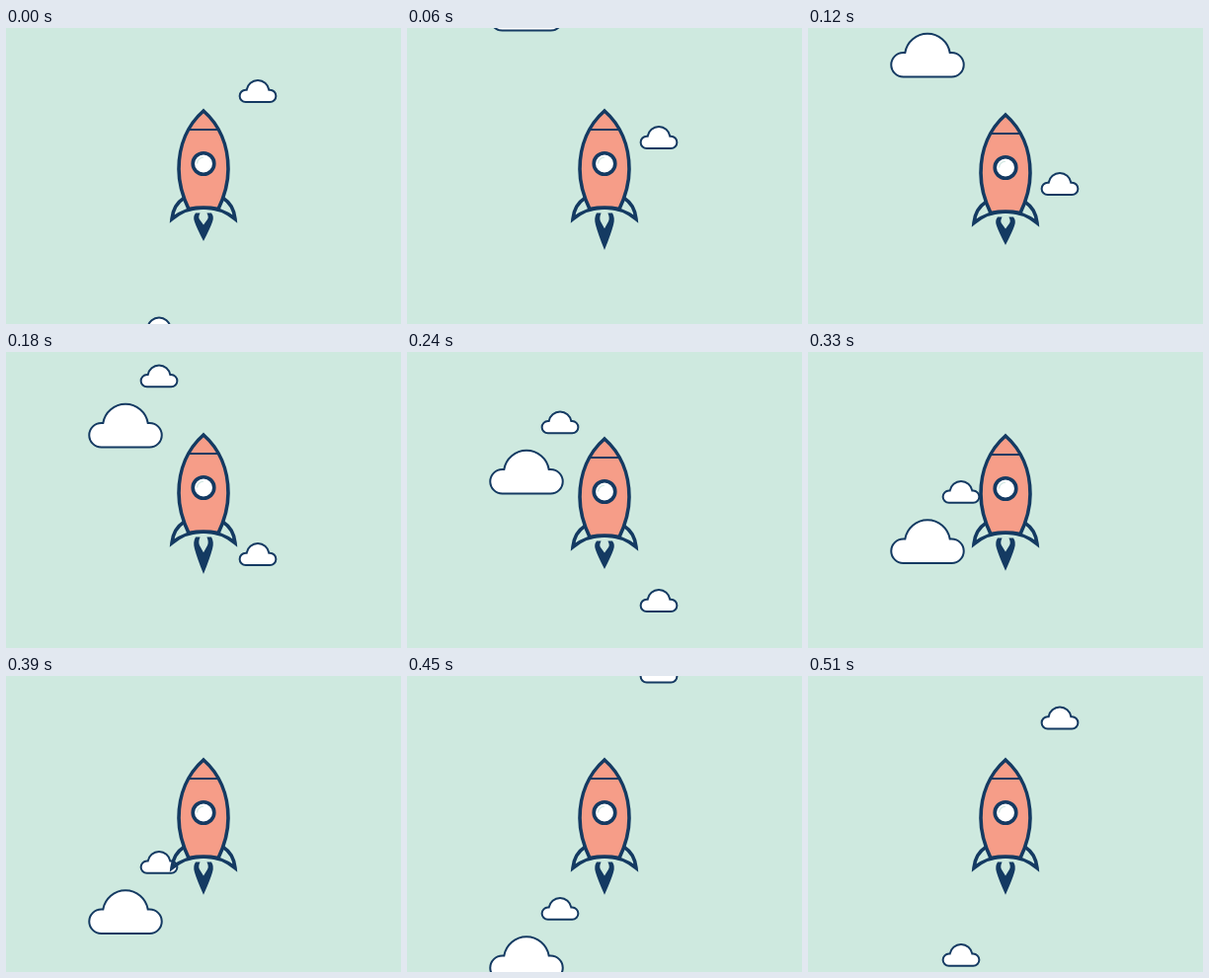
Recreate the animation shown at these times as an HTML page. Size 400x300 px, loop 540 ms.

```html
<!DOCTYPE html>
<html lang="en">
<head>
<meta charset="utf-8">
<title>Rocket</title>
<style>
  html, body { margin: 0; width: 100%; height: 100%; overflow: hidden; background: #cee9df; }
  svg { display: block; width: 100vw; height: 100vh; }
  .line { stroke: #143a62; stroke-width: 3.6; fill: none; }
  .cloud { stroke: #143a62; stroke-width: 2; fill: #fff; }
  .cloud path, path.cloud { vector-effect: non-scaling-stroke; }
</style>
</head>
<body>
<svg viewBox="0 0 400 300">
  <defs>
    <path id="puff" vector-effect="non-scaling-stroke"
      d="M-24.5 44A12.25 12.25 0 0 1 -24.5 19.5H-22.7A23 23 0 0 1 22.7 19.5H24.5A12.25 12.25 0 0 1 24.5 44Z"/>
  </defs>
  <g id="sky"></g>
  <g id="rocket">
    <path id="flame" fill="#143a62"
      d="M192 0H196.6Q194.3 4 196 6.5L200 12L204 6.5Q205.7 4 203.4 0H208Q211 4 209 9Q207 15 200 28.5Q193 15 191 9Q189 4 192 0Z"/>
    <path class="line" fill="none" d="M180 172.5Q169.5 179 168 193.5Q182 182 200 182Q218 182 232 193.5Q230.5 179 220 172.5"/>
    <path class="line" style="fill:#f69d88"
      d="M185 183.5C179 171 175 158 175 143C175 119 184 98 200 84C216 98 225 119 225 143C225 158 221 171 215 183.5Q200 180.8 185 183.5Z"/>
    <path class="line" style="stroke-width:2" d="M186 103H214"/>
    <circle class="line" style="fill:#fff" cx="200" cy="137.5" r="10.8"/>
    <path d="M193.6 137.5A6.4 6.4 0 0 1 200 131.1" fill="none" stroke="#d5e9e4" stroke-width="1.4"/>
  </g>
</svg>
<script>
  const STEP = 30, COUNT = 18;
  const SPEED = 23.5, TRAVEL = 421, EXIT = 305;
  const LIFT = [4, 1, 0, 1];
  const BURN = [1, 1.17, 1.32, 1.17];

  const $ = id => document.getElementById(id);

  const clouds = [
    { x: 121, y: -88.5, size: 1 },
    { x: 255, y: 53, size: 0.5 },
    { x: 155, y: 293.3, size: 0.5 }
  ].map(c => {
    const el = document.createElementNS("http://www.w3.org/2000/svg", "use");
    el.setAttribute("href", "#puff");
    el.setAttribute("class", "cloud");
    $("sky").append(el);
    return { ...c, el };
  });

  function draw(ms) {
    const k = Math.floor(ms / STEP) % COUNT;
    for (const c of clouds) {
      let y = c.y + k * SPEED;
      if (y > EXIT) y -= TRAVEL;
      c.el.setAttribute("transform", `translate(${c.x} ${y}) scale(${c.size})`);
    }
    // The rocket rests at the top when the loop begins, then shakes.
    const lift = k ? LIFT[k % 4] : 0;
    $("rocket").setAttribute("transform", `translate(0 ${lift})`);
    $("flame").setAttribute("transform", `translate(0 187.5) scale(1 ${BURN[k % 4]})`);
  }

  const start = performance.now();
  function tick() {
    draw(performance.now() - start);
    requestAnimationFrame(tick);
  }
  draw(0);
  requestAnimationFrame(tick);
</script>
</body>
</html>
```
